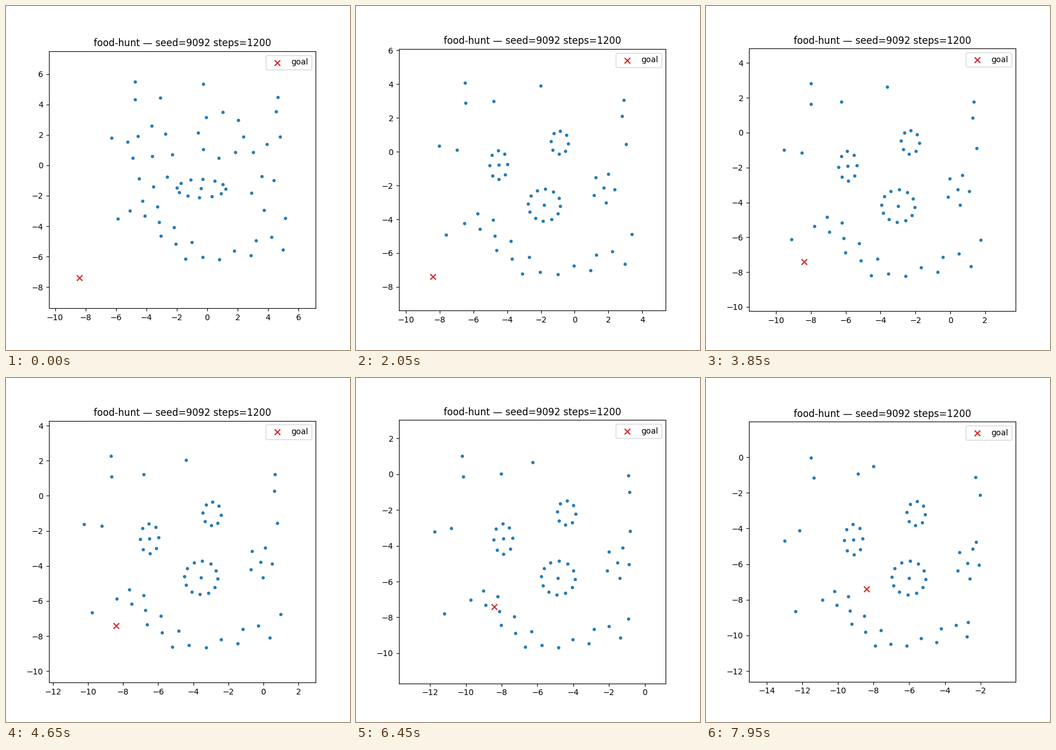
Write a matplotlib script that moves like this. It is 600 by 600 pixels and loops after 8 s.

```python
import numpy as np
import matplotlib.pyplot as plt
from matplotlib.animation import FuncAnimation

FRAMES, STEP = 160, 50
LAST = 7.95
CLOSE = 2.05                        # seconds until the groups have formed
DRIFT = np.array([-0.845, -0.695])  # shared velocity, units per second
GOAL = np.array([-8.4, -7.4])
MARGIN = 2


def pts(*values):
    return np.array(values, float).reshape(-1, 2)


def mix(a, b, u):
    return np.asarray(a) + (np.asarray(b) - np.asarray(a)) * u


# All positions are relative to the drifting swarm.
RIM_START = pts(-4.75, 5.51, -4.75, 4.32, -3.09, 4.43, -0.26, 5.34,
                4.64, 4.47, 4.53, 3.53, 4.79, 1.90, 5.13, -3.46,
                -6.30, 1.79, -5.25, 1.53, -5.89, -3.50)
RIM_END = pts(-4.79, 5.51, -4.63, 4.36, -2.16, 4.58, -1.29, 5.00,
              4.43, 4.39, 4.69, 3.42, 4.47, 0.76, 4.02, -3.75,
              -6.27, 0.82, -5.44, 1.40, -5.66, -3.14)

# Lower arc, from left to right; it contracts around its hub
HUB = np.array([-0.3, -0.5])
ARC = pts(-4.35, -2.59, -3.64, -2.07, -3.51, -2.88, -2.83, -2.39,
          -2.73, -3.24, -2.64, -4.01, -1.89, -3.53, -1.80, -4.47,
          -1.25, -5.28, -0.89, -4.37, -0.31, -5.18, 0.63, -5.31,
          1.47, -4.85, 2.38, -5.08, 2.67, -4.27, 3.54, -4.08,
          4.19, -4.76)


def rim(t):
    return mix(RIM_START, RIM_END, (t / LAST) ** 3)


def arc(t):
    return HUB + (ARC - HUB) * np.interp(t, [0, 5.4, LAST], [1.18, 1, 0.95])


def group(t, count, phase, centres, radii, core=True):
    """Dots on a loose ellipse that tightens, then travels on as one."""
    start, formed, end = centres
    close = min(t / CLOSE, 1)
    travel = max(t - CLOSE, 0) / (LAST - CLOSE)
    centre = mix(mix(start, formed, close), end, 1 - (1 - travel) ** 1.5)
    angle = np.radians(phase) + 2 * np.pi * np.arange(count) / count
    circle = np.column_stack([np.cos(angle), np.sin(angle)])
    dots = centre + circle * mix(*radii, close)
    return np.vstack([dots, centre]) if core else dots


def swarm(t):
    local = np.vstack([
        rim(t),
        arc(t),
        group(t, 12, 86, [(-0.4, -1.5), (-0.07, -1.72), (0.70, -1.25)],
              [(1.6, 0.6), (0.95, 0.95)]),
        group(t, 8, 130, [(0.9, 2.0), (0.83, 1.98), (1.1, 2.37)],
              [(1.5, 1.5), (0.52, 0.68)], core=False),
        group(t, 8, 93, [(-3.6, 0.6), (-2.78, 0.65), (-2.42, 0.91)],
              [(1.3, 2.0), (0.52, 0.85)]),
        group(t, 5, 65, [(3.6, -0.7), (3.45, -0.7), (4.0, -0.42)],
              [(0.8, 2.3), (0.65, 0.9)]),
    ])
    return local + DRIFT * t


fig, ax = plt.subplots(figsize=(6, 6), dpi=100)
ax.set_aspect("equal")
ax.set_title("food-hunt — seed=9092 steps=1200")
dots = ax.scatter(*swarm(0).T, s=10, c="tab:blue", alpha=0.95)
ax.scatter(*GOAL, s=50, c="tab:red", marker="x", label="goal")
ax.legend(loc="upper right")


def draw(frame):
    pos = swarm(frame * STEP / 1000)
    dots.set_offsets(pos)
    seen = np.vstack([pos, GOAL])
    low, high = seen.min(axis=0) - MARGIN, seen.max(axis=0) + MARGIN
    ax.set_xlim(low[0], high[0])
    ax.set_ylim(low[1], high[1])
    return (dots,)


anim = FuncAnimation(fig, draw, frames=FRAMES, interval=STEP, repeat=True, repeat_delay=0)
plt.show()
```
